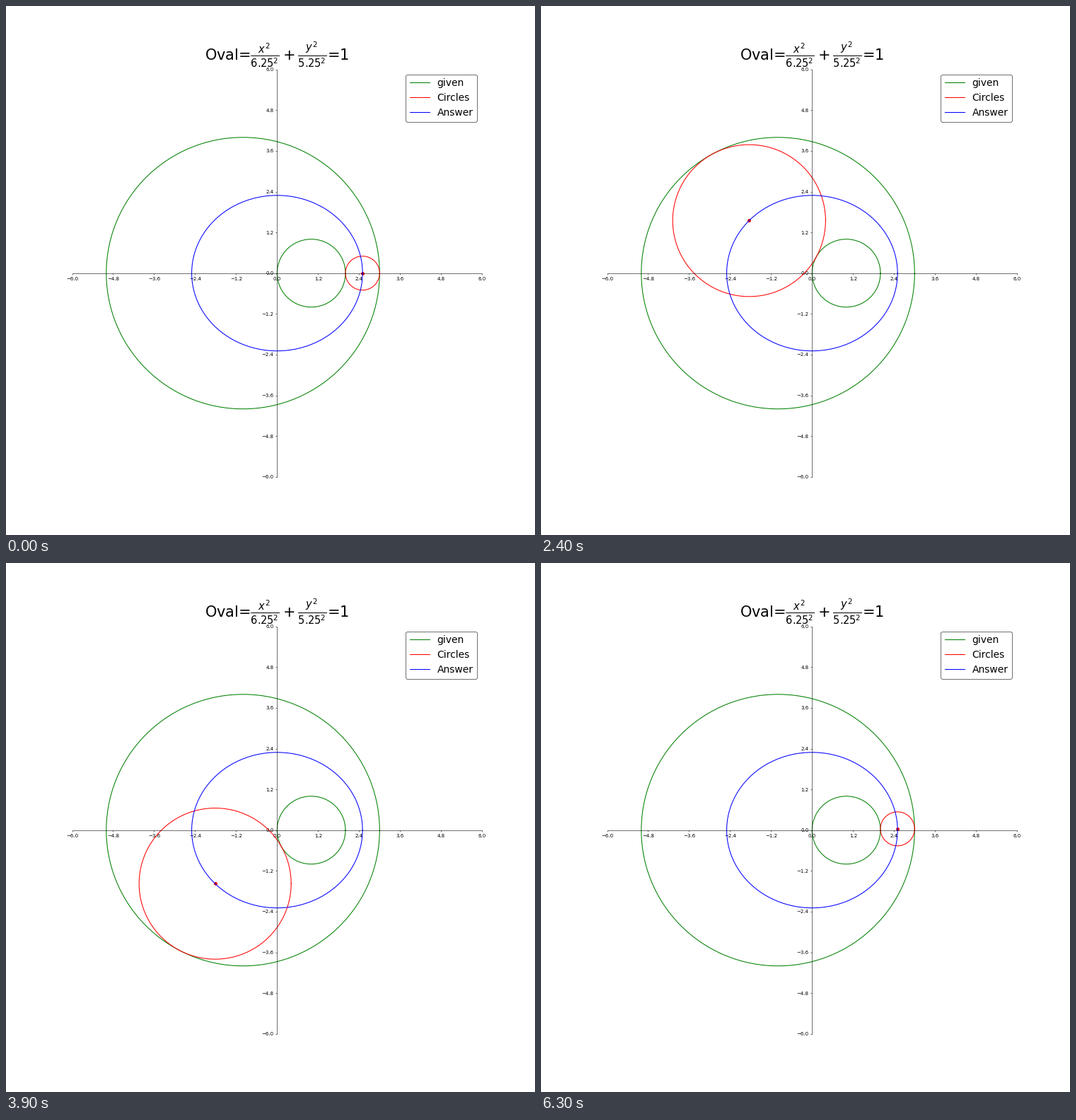
Animation of 748x748 px, one loop 6400 ms. Source, as a matplotlib script:

```python
import numpy as np
import matplotlib.pyplot as plt
from matplotlib.animation import FuncAnimation

DPI = 50
FRAMES = 64
STEP = 0.1  # radians per frame
A, B = 2.5, np.sqrt(5.25)  # semi-axes of the oval

theta = np.linspace(0, 2 * np.pi, 201)


def circle(x, y, r):
    return x + r * np.cos(theta), y + r * np.sin(theta)


fig, ax = plt.subplots(figsize=(748 / DPI, 748 / DPI), dpi=DPI)
ax.set(xlim=(-6, 6), ylim=(-6, 6))
ticks = np.linspace(-6, 6, 11)
ax.set_xticks(ticks)
ax.set_yticks(ticks)
for side in ("left", "bottom"):
    ax.spines[side].set_position(("data", 0))
for side in ("right", "top"):
    ax.spines[side].set_visible(False)

# The two fixed circles, the moving tangent circle and the path of its centre
ax.plot(*circle(-1, 0, 4), color="green", label="given")
ax.plot(*circle(1, 0, 1), color="green")
ring, = ax.plot([], [], color="red", label="Circles")
dot, = ax.plot([], [], "o", color="red")
ax.plot(A * np.cos(theta), B * np.sin(theta), color="blue", label="Answer")

ax.set_title(r"Oval=$\frac{x^2}{6.25^2}+\frac{y^2}{5.25^2}$=1", fontsize=30)
ax.legend(loc="upper right", fontsize=20, edgecolor="black")


def update(frame):
    t = STEP * frame
    x, y = A * np.cos(t), B * np.sin(t)
    ring.set_data(*circle(x, y, 1.5 - np.cos(t)))
    dot.set_data([x], [y])
    return ring, dot


anim = FuncAnimation(fig, update, frames=FRAMES, interval=100,
                     repeat=True, repeat_delay=0)
plt.show()
```
